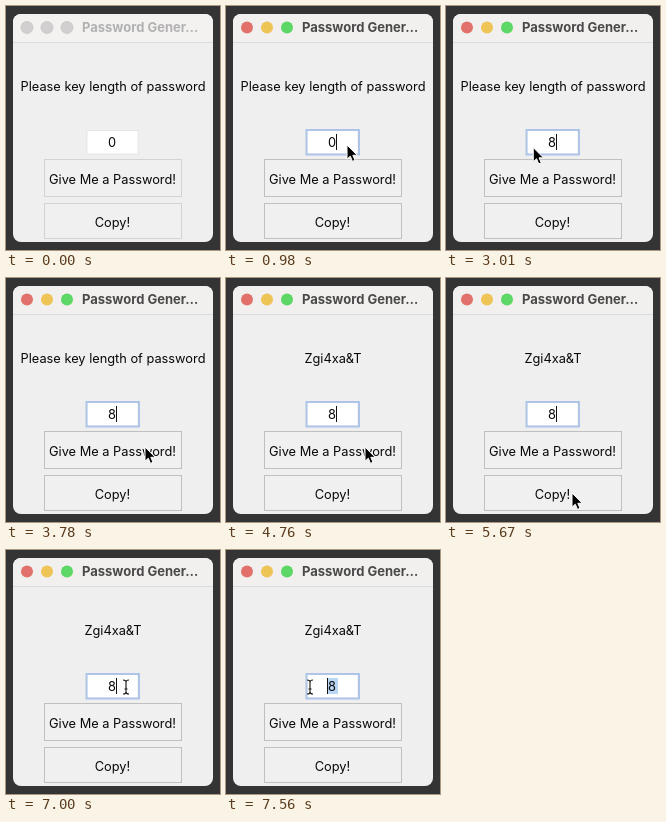
An HTML page for the animation above (8000 ms loop, 214 by 244 pixels).

```html
<!DOCTYPE html>
<html lang="en">
<head>
<meta charset="utf-8">
<title>Password generator</title>
<style>
  html, body { margin: 0; width: 100%; height: 100%; overflow: hidden; background: #343434; }
  svg { display: block; width: 214px; height: 244px; }
  text { font: 12.8px Inter, sans-serif; text-anchor: middle; fill: #080808; }
  .title { font-size: 13px; font-weight: 700; text-anchor: start; fill: #b2b1b1; }
  .bar { fill: #f3f2f1; }
  .light { fill: #d1cfcf; stroke: #c2c0c0; stroke-width: .7; }
  .button { fill: #f0f0f0; stroke: #d3d3d3; }
  .button.pressed { fill: #e2e2e2; }
  .entry { fill: #fff; stroke: #dadada; stroke-width: .6; }
  .ring { fill: none; stroke: #adc5e6; stroke-width: 2; visibility: hidden; }
  .active .title { fill: #4a4949; }
  .active .bar { fill: #f1f0ee; }
  .active .light { fill: var(--color); stroke: none; }
  .active .button { stroke: #c0c0c0; }
  .active .ring { visibility: visible; }
</style>
</head>
<body>
<svg id="stage" viewBox="0 0 214 244">
  <rect width="214" height="244" fill="#343434"/>
  <rect x="7" y="8" width="200" height="228" rx="8" fill="#efefef"/>
  <path class="bar" d="M7 36V16a8 8 0 0 1 8-8H199a8 8 0 0 1 8 8V36z"/>
  <path d="M7 36.5H207" stroke="#dcdbda"/>
  <circle class="light" cx="21" cy="21.5" r="6" style="--color:#e2716c"/>
  <circle class="light" cx="41" cy="21.5" r="6" style="--color:#efc456"/>
  <circle class="light" cx="61" cy="21.5" r="6" style="--color:#5dd766"/>
  <text class="title" x="76" y="26">Password Gener…</text>
  <text id="label" x="107" y="85"></text>

  <rect class="entry" x="81" y="124.5" width="51" height="23.5"/>
  <rect class="ring" x="80.5" y="124" width="52.5" height="24.5"/>
  <rect id="highlight" x="101" y="128" width="11" height="16" fill="#b9d6f4"/>
  <text id="digit" x="106" y="141"></text>
  <rect id="caret" y="128" width="1" height="16" fill="#111"/>

  <rect id="give" class="button" x="38.5" y="153.5" width="137" height="37"/>
  <text x="106.5" y="177.5">Give Me a Password!</text>
  <rect id="copy" class="button" x="38.5" y="197.5" width="137" height="35"/>
  <text x="106.5" y="221">Copy!</text>

  <path id="arrow" d="M0 0V14.2L3.3 11.2L5.5 16.4L8 15.3L5.8 10.3H10.2Z"
        fill="#000" stroke="#fff" stroke-linejoin="round"/>
  <g id="beam" fill="none">
    <path id="shape" d="M-3 -7Q0 -7 0 -5Q0 -7 3 -7M0 -5V5M-3 7Q0 7 0 5Q0 7 3 7M-1.5 2H1.5"
          stroke="#111" stroke-width="1.1"/>
  </g>
</svg>
<script>
const LOOP = 8000, STEP = 70;
const FOCUS = 910, TYPE = 2520, GENERATE = 3920, COPY = 6020;
const BLINK = 925, CARET_ON = 630;
const $ = id => document.getElementById(id);

const moves = [
  { from: 70, to: 140, x: 140, y: 204 },
  { from: 210, to: 770, x: 121, y: 139 },
  { from: 1050, to: 1260, x: 130, y: 141 },
  { from: 1400, to: 1960, x: 73, y: 134 },
  { from: 2800, to: 3500, x: 139, y: 169 },
  { from: 4760, to: 5040, x: 126, y: 215 },
  { from: 6160, to: 6650, x: 120, y: 137 },
  { from: 7070, to: 7420, x: 84, y: 137 }
];

const ease = p => p * p * (3 - 2 * p);
const show = (id, on) => $(id).setAttribute('visibility', on ? 'visible' : 'hidden');
const press = (id, t, at) => $(id).classList.toggle('pressed', Math.abs(t - at) < STEP);

function pointerAt(t) {
  let x = 28, y = 83;
  for (const m of moves) {
    const p = ease(Math.min(1, Math.max(0, (t - m.from) / (m.to - m.from))));
    x += (m.x - x) * p;
    y += (m.y - y) * p;
  }
  return [x, y];
}

function render(t) {
  const [x, y] = pointerAt(t);
  const typed = t >= TYPE;
  // Dragging leftwards past the digit selects it
  const selected = x < 101 && (typed ? t > COPY : t > FOCUS);
  const beam = t > COPY && y < 149;
  const blinkStart = typed ? TYPE - 595 : FOCUS;

  $('stage').classList.toggle('active', t >= FOCUS);
  $('label').textContent = t < GENERATE ? 'Please key length of password' : 'Zgi4xa&T';
  $('digit').textContent = typed ? '8' : '0';
  press('give', t, GENERATE);
  press('copy', t, COPY);

  show('highlight', selected);
  show('caret', t >= FOCUS && (t - blinkStart) % BLINK < CARET_ON);
  $('caret').setAttribute('x', selected ? 101 : 110);

  show('arrow', t >= 70 && !beam);
  show('beam', beam);
  $(beam ? 'beam' : 'arrow').setAttribute('transform', `translate(${x} ${y})`);
}

// Light halo behind the text pointer
const halo = $('shape').cloneNode();
halo.removeAttribute('id');
halo.setAttribute('stroke', '#fff');
halo.setAttribute('stroke-width', 2.4);
$('beam').prepend(halo);

const start = performance.now();
function tick() {
  const t = (performance.now() - start) % LOOP;
  render(Math.floor(t / STEP) * STEP);
  requestAnimationFrame(tick);
}
tick();
</script>
</body>
</html>
```
